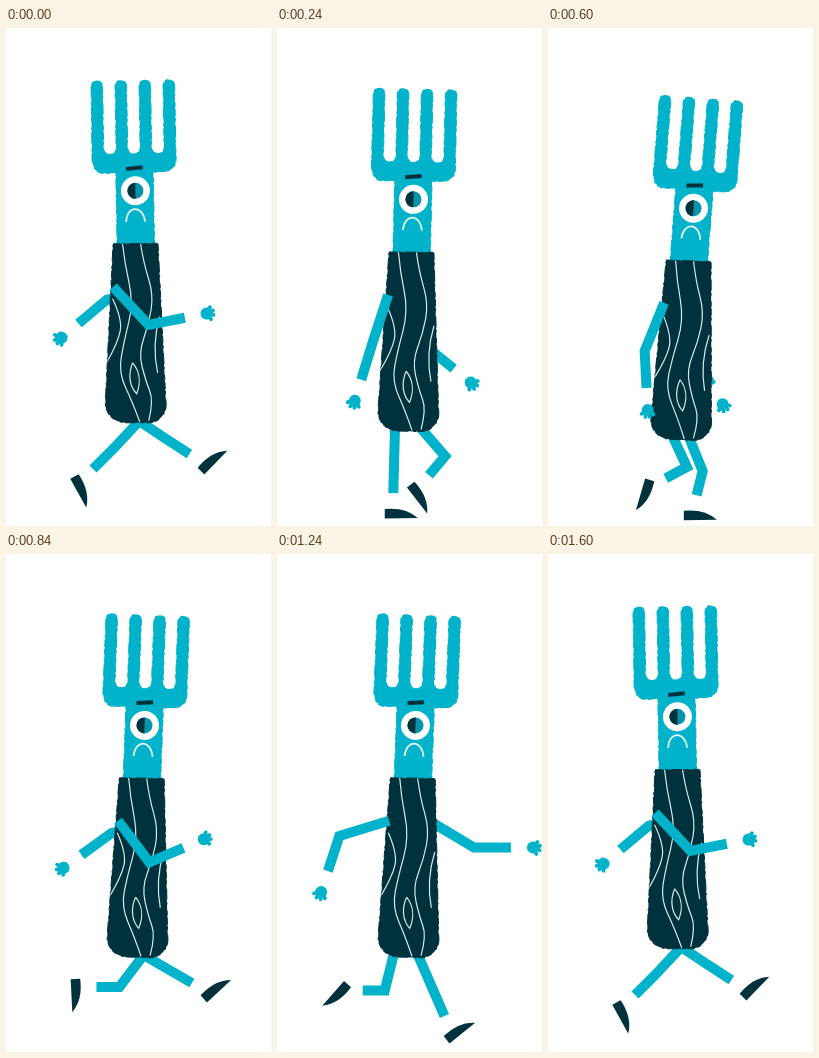
These frames come from a looping animation (265 px wide and 498 px high, 1640 ms). An HTML page with a canvas:

```html
<!DOCTYPE html>
<html lang="en">
<head>
<meta charset="utf-8">
<title>Walking fork</title>
<style>
  html, body { margin: 0; width: 100%; height: 100%; overflow: hidden; background: #fff; }
  canvas { display: block; }
</style>
</head>
<body>
<canvas id="stage" width="265" height="498"></canvas>
<script>
const ctx = document.getElementById('stage').getContext('2d');
const TEAL = '#00b2ca', DARK = '#00323d', GRAIN = '#d5eaee', IRIS = '#0894a8';
const LOOP = 1640, STEP = 40, STRIDE = 800;
const RAD = Math.PI / 180;

// Pose tracks over one stride; angles in degrees from straight down, positive forward.
const TIMES = [0, 40, 240, 440, 600];
const NEAR_ARM = { upper: [43, 37, -18, -73, -22], lower: [101, 113, -17, -18, 3] };
const FAR_ARM = { upper: [-75, -77, -6, 59, -15], lower: [-50, -54, 51, 90, 30] };
const NEAR_LEG = {
  hip: [-13, -13, -13, -12, -13],
  upper: [56, 60, -1.5, -14, 25], upperLen: [48, 47, 45, 48, 45],
  lower: [57, 60, -1.5, -90, -62], lowerLen: [32, 31, 30, 22, 24],
  foot: [-45, -42, 0, 132, 107]
};
const FAR_LEG = {
  hip: [14, 14, 4, 5, 4],
  upper: [-43, -37, 41, 23.5, 22], upperLen: [52, 53, 50, 48, 47.5],
  lower: [-45, -90, -40, 23.5, -14], lowerLen: [30, 23, 25, 30, 25],
  foot: [62, 88, 53, -38, 0]
};

// Periodic cubic interpolation of one track.
function sample(values, phase) {
  const n = TIMES.length;
  const timeAt = k => TIMES[(k + n) % n] + STRIDE * Math.floor(k / n);
  const valueAt = k => values[(k + n) % n];
  const slope = k => (valueAt(k + 1) - valueAt(k - 1)) / (timeAt(k + 1) - timeAt(k - 1));
  let i = n - 1;
  while (TIMES[i] > phase) i--;
  const span = timeAt(i + 1) - timeAt(i);
  const u = (phase - timeAt(i)) / span, u2 = u * u, u3 = u2 * u;
  return valueAt(i) * (2 * u3 - 3 * u2 + 1) + slope(i) * span * (u3 - 2 * u2 + u)
    + valueAt(i + 1) * (3 * u2 - 2 * u3) + slope(i + 1) * span * (u3 - u2);
}

function pose(tracks, phase) {
  const result = {};
  for (const key in tracks) result[key] = sample(tracks[key], phase);
  return result;
}

function reach([x, y], degrees, length) {
  return [x + Math.sin(degrees * RAD) * length, y + Math.cos(degrees * RAD) * length];
}

function rotated(origin, x, y, degrees) {
  const c = Math.cos(degrees * RAD), s = Math.sin(degrees * RAD);
  return [origin[0] + x * c - y * s, origin[1] + x * s + y * c];
}

function within(origin, degrees, draw) {
  ctx.save();
  ctx.translate(...origin);
  ctx.rotate(degrees * RAD);
  draw();
  ctx.restore();
}

function line(points, color, width, cap = 'butt') {
  ctx.beginPath();
  points.forEach(p => ctx.lineTo(...p));
  ctx.strokeStyle = color;
  ctx.lineWidth = width;
  ctx.lineCap = cap;
  ctx.lineJoin = 'miter';
  ctx.stroke();
}

function curve(points) {
  ctx.beginPath();
  ctx.moveTo(...points[0]);
  const last = points.length - 1;
  for (let i = 1; i < last; i++) {
    const [x, y] = points[i], next = points[i + 1];
    const end = i === last - 1 ? next : [(x + next[0]) / 2, (y + next[1]) / 2];
    ctx.quadraticCurveTo(x, y, ...end);
  }
  ctx.stroke();
}

// Fill with a slightly ragged, printed edge.
function roughFill(color) {
  ctx.fillStyle = ctx.strokeStyle = color;
  ctx.fill();
  ctx.lineWidth = 1;
  ctx.lineCap = 'butt';
  ctx.setLineDash([7, 2, 3, 5, 11, 3, 2, 6, 5, 2]);
  ctx.stroke();
  ctx.setLineDash([]);
}

function disc(x, y, r, color, from = 0, to = 2 * Math.PI) {
  ctx.beginPath();
  ctx.arc(x, y, r, from, to);
  ctx.fillStyle = color;
  ctx.fill();
}

function drawHand(center, degrees) {
  within(center, -degrees, () => {
    disc(0, -1, 6, TEAL);
    [-62, -22, 14, 50].forEach(a =>
      line([[0, -1], reach([0, -1], a, 7.2)], TEAL, 3.8, 'round'));
  });
}

function drawArm(shoulder, upperLen, tracks, phase) {
  const { upper, lower } = pose(tracks, phase);
  const elbow = reach(shoulder, upper, upperLen);
  const wrist = reach(elbow, lower, 37);
  line([wrist, reach(elbow, lower, 53)], '#fff', 10);
  line([shoulder, elbow, wrist], TEAL, 10);
  drawHand(reach(elbow, lower, 60), lower);
}

function drawLeg(joint, tracks, phase) {
  const p = pose(tracks, phase);
  const hip = joint(p.hip, -13);
  const knee = reach(hip, p.upper, p.upperLen);
  const ankle = reach(knee, p.lower, p.lowerLen);
  line([hip, knee, ankle], TEAL, 10);
  within(reach(ankle, p.lower, 20), p.foot, () => {
    ctx.beginPath();
    ctx.moveTo(-8, -4);
    ctx.quadraticCurveTo(13, -6, 25, 5);
    ctx.lineTo(-8, 5.5);
    ctx.closePath();
    ctx.fillStyle = DARK;
    ctx.fill();
  });
}

function drawHandle() {
  ctx.beginPath();
  ctx.moveTo(-22.5, -179);
  ctx.lineTo(22.5, -179.5);
  ctx.lineTo(30, -25);
  ctx.arcTo(32, 0, 0, 0, 18);
  ctx.arcTo(-33, 0, -30, -25, 20);
  ctx.closePath();
  roughFill(DARK);

  ctx.strokeStyle = GRAIN;
  ctx.lineWidth = 1.2;
  curve([[-13, -179], [-11, -160], [-2, -120], [-12, -80], [-17, -50], [-3, -20], [4, -1]]);
  curve([[5, -179], [8, -160], [18, -128], [13, -98], [3, -70], [10, -42], [18, -22], [13, -2]]);
  curve([[-23, -124], [-13, -103], [-18, -80], [-28, -62]]);
  curve([[24, -106], [16, -78], [22, -50]]);
  ctx.beginPath();
  ctx.moveTo(-3, -60);
  ctx.bezierCurveTo(-8, -48, -6, -36, 1, -29);
  ctx.bezierCurveTo(6, -42, 3, -53, -3, -60);
  ctx.stroke();
}

function drawHead() {
  const tines = [-36, -12, 12, 36], half = 5.8, tip = -158, gap = -96;
  ctx.beginPath();
  ctx.moveTo(-42, -84);
  tines.forEach((x, i) => {
    ctx.lineTo(x - half, tip);
    ctx.arc(x, tip, half, Math.PI, 0);
    if (i < 3) {
      ctx.lineTo(x + half, gap);
      ctx.arc(x + 12, gap, 12 - half, Math.PI, 0, true);
    }
  });
  ctx.lineTo(42, -84);
  ctx.quadraticCurveTo(41.5, -73, 31, -72);
  ctx.lineTo(19, -71);
  ctx.lineTo(19, 2);
  ctx.lineTo(-18.5, 2);
  ctx.lineTo(-18.5, -71);
  ctx.lineTo(-33, -71);
  ctx.quadraticCurveTo(-41, -73, -42, -84);
  ctx.closePath();
  roughFill(TEAL);

  line([[-8, -75], [8.5, -76.5]], DARK, 4);
  disc(0.8, -53, 14.5, '#fff');
  disc(0.8, -53, 8, IRIS);
  disc(0.8, -53, 8, DARK, Math.PI / 2, Math.PI * 1.5);

  ctx.beginPath();
  ctx.moveTo(-9, -22);
  ctx.bezierCurveTo(-8, -39, 8, -39, 10, -22);
  ctx.strokeStyle = '#e2f5f8';
  ctx.lineWidth = 1.7;
  ctx.stroke();
}

// Two bounces per stride.
function bounce(phase, offset) {
  return 14.5 * Math.sin(4 * Math.PI * (phase - offset) / STRIDE);
}

function render(time) {
  const phase = time % STRIDE;
  const bob = bounce(phase, 40), sway = bounce(phase, 35);
  const pelvis = [131 + 0.15 * bob, 403.3 + bob];
  const lean = 1.3 + 0.18 * sway;
  const headLean = 1.75 + 0.36 * sway;
  const joint = (x, y) => rotated(pelvis, x, y, lean);

  ctx.fillStyle = '#fff';
  ctx.fillRect(0, 0, 265, 498);
  drawArm(joint(19.5, -136), 50, FAR_ARM, phase);
  drawLeg(joint, FAR_LEG, phase);
  drawLeg(joint, NEAR_LEG, phase);
  within(joint(0, -179), headLean, drawHead);
  within(pelvis, lean, drawHandle);
  drawArm(joint(-22.5, -136), 52, NEAR_ARM, phase);
}

const start = performance.now();
function tick() {
  const time = (performance.now() - start) % LOOP;
  render(Math.floor(time / STEP) * STEP);
  requestAnimationFrame(tick);
}
tick();
</script>
</body>
</html>
```
